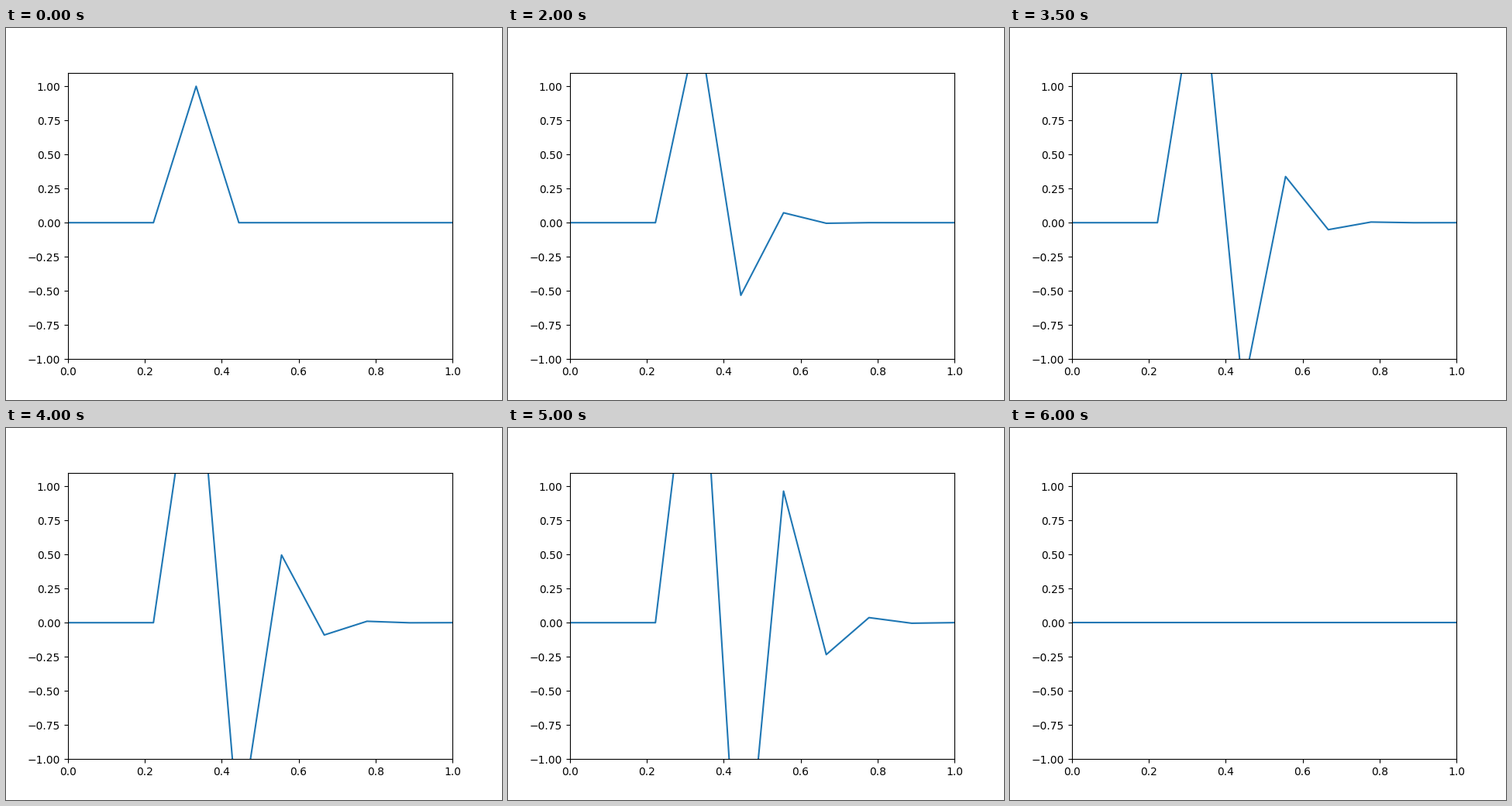
Animation of 640x480 px, one loop 6500 ms. Source, as a matplotlib script:

```python
import numpy as np
import matplotlib.pyplot as plt
from matplotlib.animation import FuncAnimation

POINTS = 10
STEPS = 12
COURANT = 0.1
INTERVAL = 500


def advance(u):
    """One explicit step of the unstable advection scheme."""
    new = u.copy()
    new[1:] = (1 + COURANT) * u[1:] - COURANT * u[:-1]
    return new


x = np.linspace(0, 1, POINTS)
pulse = np.zeros(POINTS)
pulse[3] = 1.0

states = [pulse]
while len(states) < STEPS:
    states.append(advance(states[-1]))
states.append(np.zeros(POINTS))  # the loop closes on a flat line

fig, ax = plt.subplots(figsize=(6.4, 4.8), dpi=100)
ax.set_xlim(0, 1)
ax.set_ylim(-1, 1.1)
line, = ax.plot(x, pulse)


def update(step):
    line.set_data(x, states[step])
    return line,


anim = FuncAnimation(fig, update, frames=len(states), interval=INTERVAL,
                     repeat=True, repeat_delay=0)
plt.show()
```
